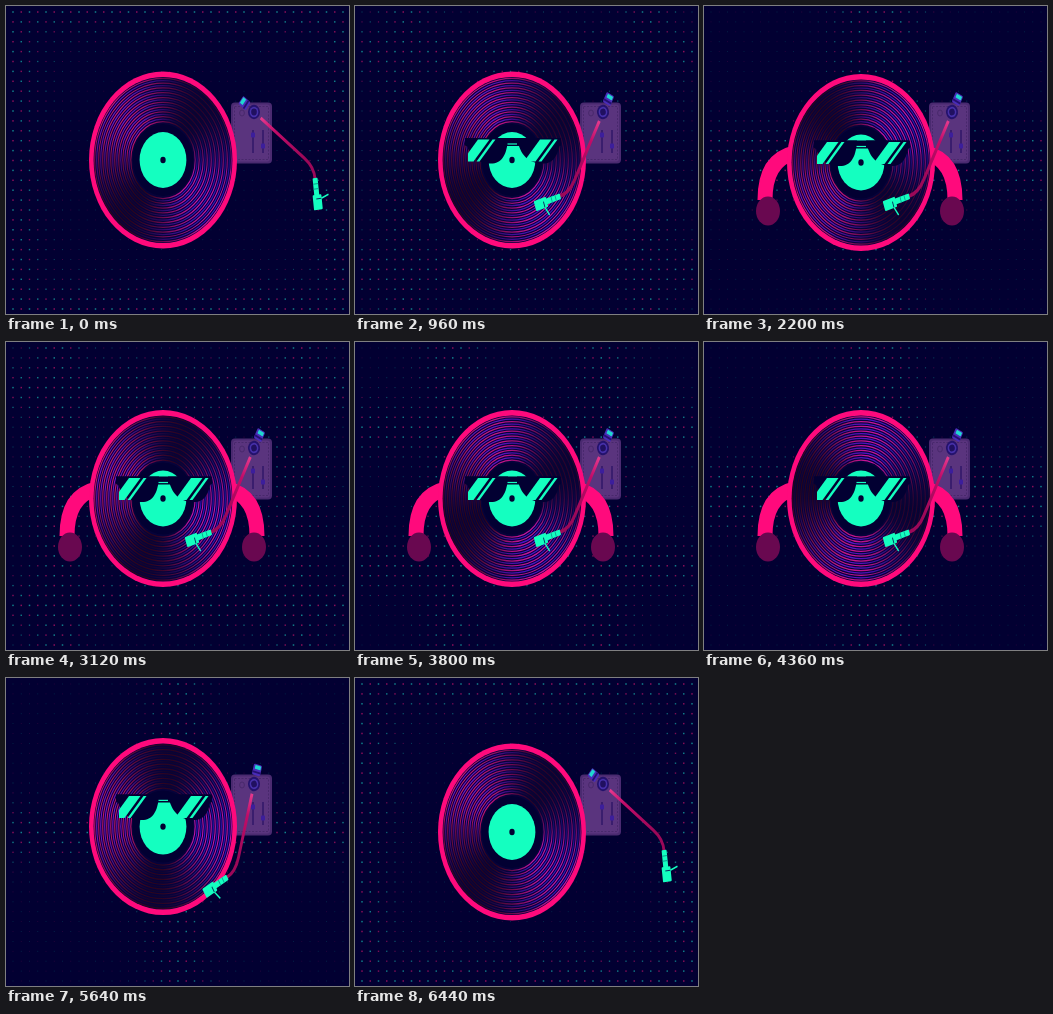
Recreate the animation shown at these times as an HTML page with a canvas. Size 343 by 308 pixels, loop 6.48 s.

```html
<!DOCTYPE html>
<html lang="en">
<head>
<meta charset="utf-8">
<title>Turntable</title>
<style>
html, body { margin: 0; width: 100%; height: 100%; overflow: hidden; background: #020032; }
canvas { display: block; width: 343px; height: 308px; }
</style>
</head>
<body>
<canvas id="stage" width="343" height="308"></canvas>
<script>
const g = document.getElementById('stage').getContext('2d');
const LOOP = 6480, STEP = 40, TAU = Math.PI * 2, RATIO = 1.196;
const NAVY = '#020032', PINK = '#ff0a7c', TEAL = '#14ffc0';

const clamp = v => Math.max(0, Math.min(1, v));
const mix = (a, b, k) => a + (b - a) * k;

function ramp(t, from, to) {
  const v = clamp((t - from) / (to - from));
  return v * v * (3 - 2 * v);
}

function at(x, y, draw) {
  g.save();
  g.translate(x, y);
  draw();
  g.restore();
}

function disc(color, x, y, rx, ry = rx) {
  g.fillStyle = color;
  g.beginPath();
  g.ellipse(x, y, rx, ry, 0, 0, TAU);
  g.fill();
}

function line(color, width, x1, y1, x2, y2) {
  g.strokeStyle = color;
  g.lineWidth = width;
  g.beginPath();
  g.moveTo(x1, y1);
  g.lineTo(x2, y2);
  g.stroke();
}

function box(color, x, y, w, h, r) {
  g.fillStyle = color;
  g.beginPath();
  g.roundRect(x, y, w, h, r);
  g.fill();
}

// Bands of bright dots sweep between the edges and the centre lines
function drawDots(t) {
  const phase = t < 720 || t > 6120 ? 0 : ((t - 720) % 1080) / 1080;
  const crest = 1 - ramp(phase, .12, .42) + ramp(phase, .72, 1);
  const band = d => Math.exp(-(((d - crest) / .24) ** 2));
  for (let i = 0; i <= 40; i++) {
    for (let j = 0; j <= 30; j++) {
      const glow = Math.max(band(Math.abs(i - 20) / 20), band(Math.abs(j - 15) / 15));
      const size = mix(.9, 1.5, glow);
      g.globalAlpha = mix(.22, .72, glow);
      g.fillStyle = (i + j) % 2 ? '#c01468' : '#18b4b0';
      g.fillRect(7 + i * 8.25 - size / 2, 6 + j * 9.9 - size / 2, size, size);
    }
  }
  g.globalAlpha = 1;
}

function drawDeck() {
  box('#4a2a70', 225, 96.5, 41, 61, 4);
  box('#5a347e', 227, 98.5, 37, 57, 3);
  g.strokeStyle = '#442668';
  g.lineWidth = .8;
  g.setLineDash([2, 1.5]);
  g.strokeRect(228.5, 100.5, 34, 53);
  g.setLineDash([]);
  g.beginPath();
  g.ellipse(236, 107, 2.4, 3, 0, 0, TAU);
  g.stroke();
  for (const [x, y] of [[247, 129], [257, 140]]) {
    line('#33196a', 1.6, x, 124, x, 147);
    box('#3c1e9c', x - 2, y - 2.5, 4, 5, 1);
  }
}

function drawLimb(side, out, dy) {
  if (out <= 0) return;
  at(156, dy, () => {
    g.scale(side, 1);
    const x = mix(50, 92, out), y = mix(188, 205, out);
    const elbow = 70 + 25 * out + 72 * out * (1 - out);
    g.strokeStyle = PINK;
    g.lineWidth = 15;
    g.beginPath();
    g.moveTo(66, 147);
    g.quadraticCurveTo(elbow, 154, x + 3, y - 11);
    g.stroke();
    disc('#690850', x, y, 12, 14.5);
  });
}

// Two opposite bright wedges that turn with the record
function sheen(turn, hue) {
  const fill = g.createConicGradient(0, 0, 0);
  for (let k = 0; k <= 36; k++) {
    const a = k / 36 * TAU;
    const light = 9 + 34 * Math.cos(a - turn) ** 2;
    fill.addColorStop(k / 36, `hsl(${hue - 12 * Math.cos(a)}, 82%, ${light}%)`);
  }
  return fill;
}

function drawRecord(dy, turn, squash) {
  at(157, 154 + dy, () => {
    g.scale((1 + squash) / RATIO, 1 - squash);
    disc(PINK, 0, 0, 88.5);
    disc('#06023a', 0, 0, 83);
    const tints = [sheen(turn, 318), sheen(turn, 262)];
    g.lineWidth = 1.25;
    for (let n = 0; n < 19; n++) {
      g.strokeStyle = tints[n % 2];
      g.beginPath();
      g.arc(0, 0, 38.5 + n * 2.4, 0, TAU);
      g.stroke();
    }
    disc(NAVY, 0, 0, 36);
    disc(TEAL, 0, 0, 28);
    disc(NAVY, 0, 0, 3.2);
  });
}

function lens(x, tilt) {
  g.fillStyle = NAVY;
  g.beginPath();
  g.moveTo(x, 132);
  g.lineTo(x + 43, 132);
  g.bezierCurveTo(x + 42 - tilt, 150, x + 36, 157.5, x + 26, 157.5);
  g.bezierCurveTo(x + 12, 157.5, x + 3 - tilt, 150, x, 132);
  g.fill();
}

function glint(x, w) {
  g.fillStyle = TEAL;
  g.beginPath();
  g.moveTo(x, 133.5);
  g.lineTo(x + w, 133.5);
  g.lineTo(x + w - 16, 155.5);
  g.lineTo(x - 16, 155.5);
  g.fill();
}

function drawGlasses(dy) {
  at(0, dy, () => {
    lens(110, 0);
    lens(162, 0);
    box(NAVY, 110, 132, 96, 8, 1);
    line(TEAL, 1.2, 152.5, 138, 162, 138);
    g.save();
    g.beginPath();
    g.rect(113, 130, 92, 30);
    g.clip();
    for (const x of [123, 185]) {
      glint(x, 11.5);
      glint(x + 14.5, 3);
    }
    g.restore();
  });
}

function drawTonearm(angle) {
  at(248, 106, () => {
    g.scale(1 / RATIO, 1);
    g.rotate(angle);
    g.save();
    g.rotate(.66);
    box('#4a2cb8', -20, -5, 11, 10, 1.5);
    box('#20d8d0', -19, -4, 4, 7, .5);
    box('#241070', -13, -5, 2, 10, 0);
    g.restore();
    disc('#24126c', 0, 0, 7.2);
    disc('#4630a8', 0, 0, 5.2);
    disc('#201060', 0, 0, 3.4);
    const tube = g.createLinearGradient(7, 6, 60, 46);
    tube.addColorStop(0, '#e83c90');
    tube.addColorStop(.35, '#c00c68');
    tube.addColorStop(1, '#9c0858');
    g.strokeStyle = tube;
    g.lineWidth = 3.4;
    g.beginPath();
    g.moveTo(8, 6);
    g.lineTo(60, 46);
    g.quadraticCurveTo(72, 55, 73, 67);
    g.stroke();
    g.translate(73, 66);
    g.rotate(-.12);
    box(TEAL, -3, 0, 6, 18, 1);
    line('#0c9c90', 1, -3, 6, 3, 6);
    line('#0c9c90', 1, -3, 11, 3, 11);
    box(TEAL, -5, 17, 10.5, 15, 1);
    line(TEAL, 1.6, 5, 21, 14, 18);
    line('#0a3060', 1.1, -1, 21, 5, 21);
  });
}

function draw(t) {
  g.fillStyle = NAVY;
  g.fillRect(0, 0, 343, 308);

  const sag = 2.5 * (ramp(t, 1100, 1500) - ramp(t, 5440, 5640));
  const hop = -10 * Math.sin(TAU * clamp((t - 5560) / 880));
  const dy = sag + hop;
  const out = ramp(t, 1360, 2120) - ramp(t, 4600, 5240);
  const arm = 1.38 * (ramp(t, 0, 680) - ramp(t, 5480, 6120));
  const lift = -160 * (1 - ramp(t, 120, 680) + ramp(t, 5560, 6080));
  const turn = .7 + TAU * clamp((t - 720) / 5400);

  drawDots(t);
  drawDeck();
  drawLimb(-1, out, dy - 2.5);
  drawLimb(1, out, dy - 2.5);
  drawRecord(dy, turn, Math.max(0, hop) * .003);
  drawGlasses(dy + lift);
  drawTonearm(arm);
}

function tick() {
  const t = performance.now() % LOOP;
  draw(Math.floor(t / STEP) * STEP);
  requestAnimationFrame(tick);
}
tick();
</script>
</body>
</html>
```
